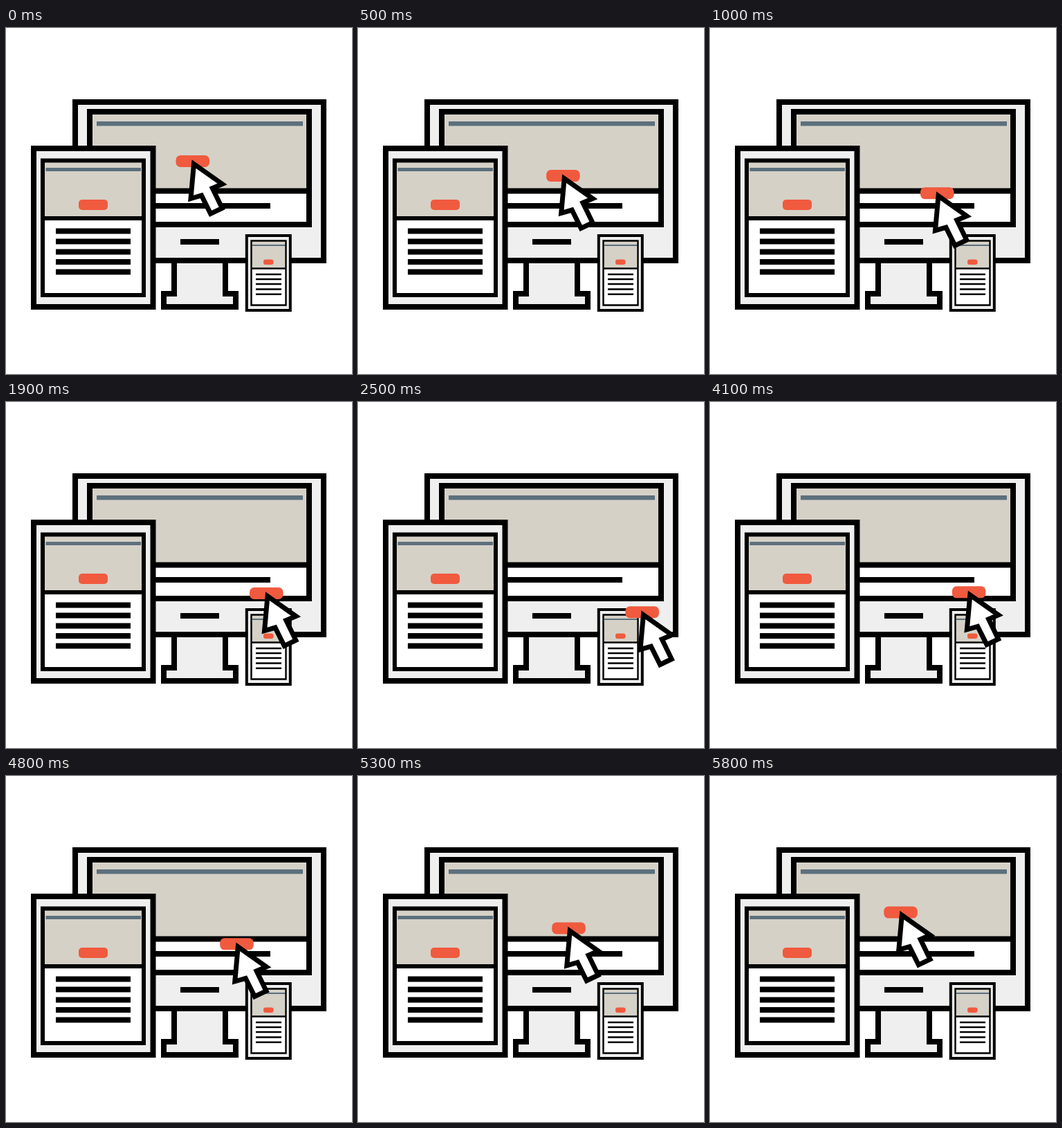
An HTML page that plays this animation: 500 by 500 pixels, repeating every 5900 ms.

```html
<!DOCTYPE html>
<html lang="en">
<head>
<meta charset="utf-8">
<title>Responsive devices</title>
<style>
  html, body { margin: 0; width: 100%; height: 100%; overflow: hidden; background: #fff; }
  svg { display: block; width: 100vw; height: 100vh; }
  .ink { stroke: #000; fill: none; }
  .body { stroke: #000; fill: #efefef; }
  .page { fill: #fff; }
  .hero { fill: #d6d1c7; }
  .bar { fill: #5c707d; }
  .cta { fill: #f05a3e; }
</style>
</head>
<body>
<svg viewBox="0 0 500 500">
  <!-- monitor -->
  <path class="body" stroke-width="8" d="M243 336V384H228V403H332V384H317V336"/>
  <rect class="body" stroke-width="8" x="100" y="107" width="359" height="229"/>
  <rect class="page" x="121" y="121" width="317" height="163"/>
  <rect class="hero" x="121" y="121" width="317" height="114"/>
  <rect class="bar" x="131" y="135" width="298" height="6.5"/>
  <path class="ink" stroke-width="8" d="M121 121H438V284H121ZM121 235.5H438M200 257H382M252 309H308"/>

  <!-- tablet -->
  <rect class="body" stroke-width="8" x="40" y="174" width="172.5" height="229"/>
  <rect class="page" x="53" y="191" width="146" height="195"/>
  <rect class="hero" x="53" y="191" width="146" height="84"/>
  <rect class="bar" x="57.5" y="202" width="137.5" height="5"/>
  <rect class="cta" x="105" y="248" width="42" height="15" rx="5"/>
  <path class="ink" stroke-width="6" d="M53 191.5H199V386H53ZM53 275H199"/>
  <path class="ink" stroke-width="8" d="M72 293.5H180M72 308.5H180M72 323.5H180M72 338H180M72 352.5H180"/>

  <!-- phone -->
  <rect class="body" stroke-width="4" x="347.8" y="300" width="63" height="108"/>
  <rect class="page" x="354.5" y="307.5" width="50" height="93"/>
  <rect class="hero" x="354.5" y="307.5" width="50" height="40"/>
  <rect class="bar" x="356" y="313" width="48" height="2"/>
  <rect class="cta" x="372" y="334.5" width="14.5" height="7.5" rx="3"/>
  <path class="ink" stroke-width="2.4" d="M354.5 307.5H404.5V400.5H354.5ZM354.5 347.5H404.5M361 356H398M361 363H398M361 370H398M361 377.5H398M361 384.7H398"/>

  <!-- dragged button and pointer, relative to the button's corner -->
  <g id="drag">
    <rect class="cta" width="48.5" height="17" rx="6.5"/>
    <path fill="#fff" stroke="#000" stroke-width="7" stroke-miterlimit="8"
      d="M26 12.5L67 41.5L52.8 47.5L66.8 76.3L50.1 84.3L37 58L21.5 62.5Z"/>
  </g>
</svg>
<script>
  const LOOP = 5900, STEP = 100, SLOPE = 0.789;
  const START = { x: 245.5, y: 184 };
  // [step, x] along the straight drag path
  const path = [[0, 245.5], [6, 277.5], [10, 304], [18, 347], [19, 352], [24, 381], [30, 413.6], [59, 245.5]];
  const drag = document.getElementById('drag');

  function xAt(step) {
    const i = path.findIndex(([s]) => s > step);
    const [s0, x0] = path[i - 1], [s1, x1] = path[i];
    return x0 + (x1 - x0) * (step - s0) / (s1 - s0);
  }

  function draw(now) {
    const x = xAt(Math.floor(now % LOOP / STEP));
    const y = START.y + (x - START.x) * SLOPE;
    drag.setAttribute('transform', `translate(${x} ${y})`);
  }

  const begin = performance.now();
  function tick() {
    draw(performance.now() - begin);
    requestAnimationFrame(tick);
  }
  tick();
</script>
</body>
</html>
```
